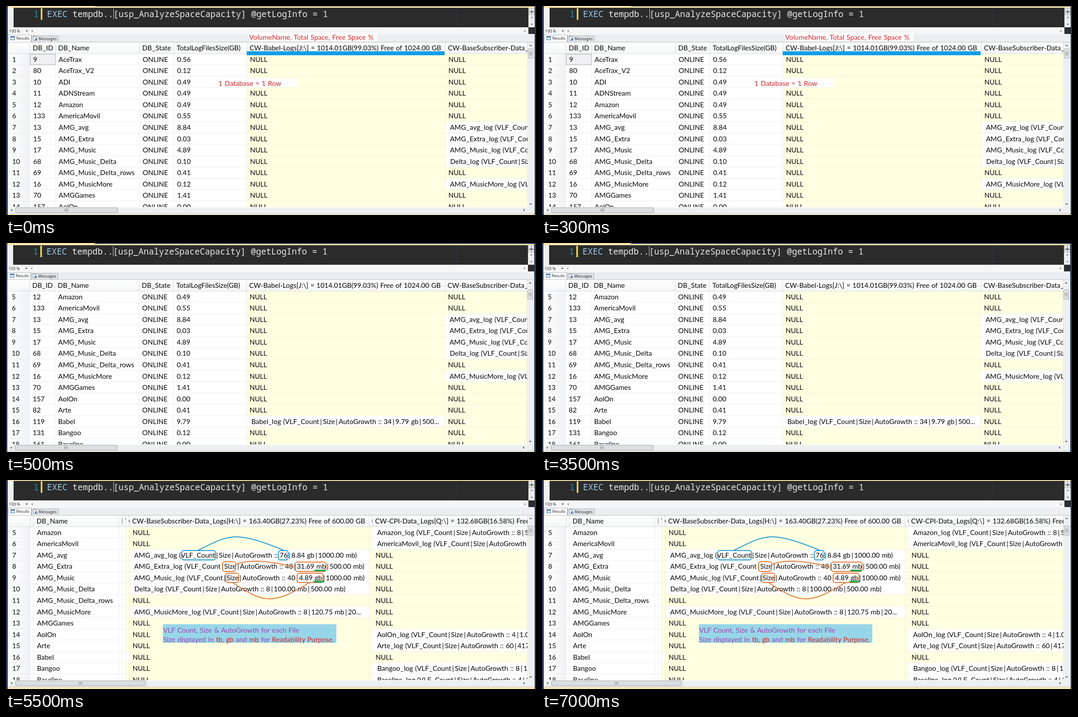
An HTML page for the animation above (8000 ms loop, 1189 px wide and 471 px high).

```html
<!DOCTYPE html>
<html lang="en">
<head>
<meta charset="utf-8">
<title>Log space report</title>
<style>
html, body { margin: 0; width: 100%; height: 100%; overflow: hidden; background: #293955; }
body { position: relative; }
.scene, .app, .col, .row, .note, svg { position: absolute; }
.scene { left: 0; top: 0; width: 1189px; height: 471px; overflow: hidden; visibility: hidden; }
.app { left: 0; top: 0; width: 1189px; height: 475px; }
svg { left: 0; top: 0; overflow: visible; }
.col, .note { font: 15.4px/25px Lato, sans-serif; word-spacing: .05em; white-space: pre; color: #080808; }
.col { top: 82px; height: 371px; overflow: hidden; background: #fff; }
.row { left: 0; right: 0; height: 25.58px; line-height: 25.58px; padding-left: 7px; overflow: hidden;
  box-sizing: border-box; box-shadow: inset -1px -1px #ececec; }
.head { top: 0; padding-left: 6px; background: linear-gradient(#fff, #f4f5f6); box-shadow: inset -1px -1px #dcdcdc; }
.null { background: #ffffe1; box-shadow: inset -1px -1px #f3f3dc; }
.num { background: linear-gradient(90deg, #fff, #f1f2f4); font-size: 15px; }
.picked { background: #f0f0f4; outline: 1px solid #a9a9ad; outline-offset: -1px; }
.note { font-size: 15.55px; line-height: 20px; word-spacing: .065em; color: #d0262b; }
.purple { color: #9a48ae; }
i { display: inline-block; width: .54em; text-align: center; font-style: normal; }
.code { font: 19.1px "Noto Sans Mono", monospace; fill: #e9e9e9; white-space: pre; }
.ui { font: 8.9px "Open Sans", sans-serif; fill: #222; }
</style>
</head>
<body>
<script>
const rows = `9 AceTrax 0.56,80 AceTrax_V2 0.12,10 ADI 0.49,11 ADNStream 0.49,12 Amazon 0.49,
133 AmericaMovil 0.55,13 AMG_avg 8.84,15 AMG_Extra 0.03,17 AMG_Music 4.89,68 AMG_Music_Delta 0.10,
69 AMG_Music_Delta_rows 0.41,16 AMG_MusicMore 0.12,70 AMGGames 1.41,157 AolOn 0.00,82 Arte 0.41,
119 Babel 9.79,131 Bangoo 0.12,161 Baseline 0.00`.split(',').map(r => r.trim().split(' '));

const log = (name, info) => ` ${name}_log (VLF_Count|Size|AutoGrowth :: ${info}`;
const babelLogs = { 16: log('Babel', '34|9.79 gb|500...') };
const baseLogs = {
  7: log('AMG_avg', '76|8.84 gb|1000.00 mb)'),
  8: log('AMG_Extra', '48|31.69 mb|500.00 mb)'),
  9: log('AMG_Music', '40|4.89 gb|1000.00 mb)'),
  10: log('Delta', '8|100.00 mb|500.00 mb)'),
  12: log('AMG_MusicMore', '8|120.75 mb|20...')
};
const cpiLogs = {
  5: log('Amazon', '8|500.00 mb|500.00 mb)'),
  6: log('AmericaMovil', '8|500.00 mb)'),
  14: log('AolOn', '4|1.00 mb|500.00 mb)'),
  15: log('Arte', '60|417.00 mb|500.00 mb)'),
  17: log('Bangoo', '8|120.00 mb|500.00 mb)'),
  18: log('Baseline', '4|1.00 mb|500.00 mb)')
};

const field = k => n => rows[n - 1][k];
const logs = set => n => set[n] || 'NULL';
const number = n => n, online = () => 'ONLINE';
const babelTitle = 'CW-Babel-Logs[J:\\] = 1014.01GB(99.03%) Free of 1024.00 GB';
const baseTitle = 'CW-BaseSubscriber-Data_Logs[H:\\] = 163.40GB(27.23%) Free of 600.00 GB';
const cpiTitle = 'CW-CPI-Data_Logs[Q:\\] = 132.68GB(16.58%) Free of 800.00 GB';

// Columns: left edge, title, value of row n; each ends where the next begins.
const leftView = [
  [7, '', number], [54, 'DB_ID', field(0)], [111, 'DB_Name', field(1)], [299.5, 'DB_State', online],
  [377, 'TotalLogFilesSize(GB)', field(2)], [540.5, babelTitle, logs(babelLogs)],
  [985.5, baseTitle, logs(baseLogs)], [1170]
];
const rightView = [
  [7, '', number], [54.7, 'DB_ID', field(0)], [62.5, 'DB_Name', field(1)], [253, 'DB_State', online],
  [261, 'TotalLogFilesSize(GB)', field(2)], [269, babelTitle, logs(babelLogs)],
  [277, baseTitle, logs(baseLogs)], [814.5, 'CW', () => 'NULL'], [822, cpiTitle, logs(cpiLogs)], [1170]
];

// Underscores and bars take a wider cell than the font gives them.
const wide = s => String(s).replace(/[_|]/g, '<i>$&</i>');
const rect = (x, y, w, h, fill, more = '') =>
  `<rect x="${x}" y="${y}" width="${w}" height="${h}" fill="${fill}" ${more}/>`;
const path = (d, fill, more = '') => `<path d="${d}" fill="${fill}" ${more}/>`;
const svg = body => `<svg width="1189" height="475">${body}</svg>`;
const note = (x, y, body) => `<div class="note" style="left:${x}px;top:${y - 10}px">${body}</div>`;

function column([x, title, value], end, first) {
  const w = end - x;
  let html = `<div class="row head" style="height:25.5px">${wide(title)}</div>`;
  for (let i = 0; i < 14; i++) {
    const n = first + i, v = value(n);
    const kind = v === 'NULL' ? 'null' : value === number ? 'num' : n === 1 && title === 'DB_ID' ? 'picked' : '';
    html += `<div class="row ${kind}" style="top:${25.5 + i * 25.58}px">${w < 10 ? '' : wide(v)}</div>`;
  }
  return `<div class="col" style="left:${x}px;width:${w}px">${html}</div>`;
}

const grid = (view, first) => view.slice(0, -1).map((c, i) => column(c, view[i + 1][0], first)).join('');

function chrome(codeY, thumbY, thumbW) {
  const edge = 'stroke="#a3a6aa" rx="1.5"';
  return svg(
    rect(4, 1, 1182, 474, '#f0f0f0') + rect(4, -1, 196, 3, '#f8e6ab') + rect(4, 1, 1182, 3, '#f8e6ab') +
    rect(17, 4, 1155, 44, '#2b2b2b') + rect(78, 5, 3.5, 26, '#f2dc55') +
    rect(241, 6, 1, 23, '#ddd') +
    path('M1011.5 4V48', 'none', 'stroke="#3d5270" stroke-dasharray="1 2"') +
    `<text class="code" x="62" y="${codeY}" style="fill:#2b91af">1</text>` +
    `<text class="code" x="92" y="${codeY}"><tspan fill="#9fcbe8">EXEC</tspan>` +
    ' tempdb..[usp_AnalyzeSpaceCapacity] @getLogInfo = 1</text>' +
    rect(1172.5, 4, 13, 44, '#eee') + rect(1173.5, 5.5, 12, 14, '#f7f7f7', 'stroke="#999"') +
    path('M1175 12h9M1175 14h9M1179.5 7v11', 'none', 'stroke="#333"') +
    path('M1177 27l2.5-3 2.5 3zM1177 40l2.5 3 2.5-3z', '#666') +
    rect(4, 48, 1168, 16, '#f6f6f6') + rect(1172, 48, 14, 15, '#2d2d30') +
    '<text class="ui" x="7" y="59.5">100 %</text>' +
    path('M44 55h5l-2.5 3z', '#333') + path('M60 54v5l-3-2.5zM1163 54v5l3-2.5z', '#777') +
    rect(4, 64, 1182, 18, '#eceef1') + rect(57.5, 67.5, 60, 14, '#e3e5e9', 'stroke="#a6aab2"') +
    rect(5.5, 65.5, 51, 17, '#fff', 'stroke="#b5b9c0"') +
    rect(10.5, 68.5, 9, 8, '#fff', 'stroke="#4c72a8"') + rect(10, 68, 10, 3, '#4c72a8') +
    path('M13.5 70v7M16.5 70v7M10 74h10', 'none', 'stroke="#8aa6cf" stroke-width=".7"') +
    rect(61.5, 68.5, 6, 9, '#fff', 'stroke="#7d8796"') + rect(65, 73, 5, 5, '#6d87b0') +
    '<text class="ui" x="23" y="76">Results</text><text class="ui" x="73" y="77">Messages</text>' +
    rect(4, 82, 1180, 386, '#fff') + rect(7, 81, 1177, 1, '#b9bcc2') +
    rect(1170, 82, 14, 372, '#eeeff0') + rect(1171.5, thumbY + .5, 11, 21, '#e0e2e5', edge) +
    path('M1174 90l3-3 3 3zM1174 445l3 3 3-3z', '#555') +
    path(`M1174 ${thumbY + 8}h6m-6 3h6m-6 3h6`, 'none', 'stroke="#777"') +
    rect(7, 454, 1177, 13, '#eeeff0') + rect(21.5, 454.5, thumbW, 11, '#dcdee1', edge) +
    path('M14 457v6l-3-3zM1161 457v6l3-3z', '#555') +
    path(`M${18 + thumbW / 2} 457v6m3-6v6m3-6v6`, 'none', 'stroke="#777"') +
    rect(4, 467, 1182, 2, '#d9dce3') + rect(4, 469, 1182, 6, '#f8e6ab'));
}

const captions =
  svg(rect(545, 60, 288, 19, '#fff') + rect(540, 102, 444, 9, '#0f9fe6') + rect(474, 163, 181, 20, '#fff')) +
  note(545.5, 70, 'VolumeName, Total Space, Free Space %') +
  note(476.5, 174, '1 Database = 1 Row');

const blue = 'stroke="#1c9ad6" stroke-width="2"', orange = 'stroke="#e2762f" stroke-width="2"';
const frame = (x, y, w, h, pen) => rect(x, y, w, h, 'none', pen + ' rx="5"');
const purple = s => `<span class="purple">${s}</span>`;
const markings =
  svg(frame(394, 159, 76, 21, blue) + frame(611, 159, 22, 21, blue) +
    path('M430 159C465 141 490 128 516 128S580 140 624 159', 'none', blue) +
    frame(486, 184, 29, 22, orange) + frame(649, 185, 69, 21, orange) +
    frame(493, 210, 29, 21, orange) + frame(653, 210, 58, 21, orange) +
    path('M515 190C545 179 585 181 649 196', 'none', orange) +
    path('M508 231C540 252 565 268 592 268S650 250 681 231', 'none', orange) +
    rect(692, 202, 25, 4, '#22a84c') + rect(690, 227, 23, 4, '#22a84c') +
    rect(352, 325, 389, 42, '#97d6e8')) +
  note(352.5, 337.5, purple('VLF Count, Size &amp; AutoGrowth for each File')) +
  note(352.5, 358.5,
    `${purple('Size displayed in')} tb, gb ${purple('and')} mb ${purple('for')} Readability Purpose.`);

function scene(dx, dy, view, first, codeY, thumbY, thumbW, notes) {
  const el = document.createElement('div');
  el.className = 'scene';
  el.innerHTML = `<div class="app" style="left:${dx}px;top:${dy}px">` +
    chrome(codeY, thumbY, thumbW) + grid(view, first) + '</div>' + notes;
  document.body.append(el);
  return el;
}

const scenes = [
  scene(0, 0, leftView, 1, 24.5, 96, 229, captions),
  scene(-1, 1, leftView, 5, 24.5, 104, 229, ''),
  scene(0, -2, rightView, 5, 25, 105, 292, markings)
];

function draw() {
  const t = performance.now() % 8000;
  const current = t < 500 ? 0 : t < 5500 ? 1 : 2;
  scenes.forEach((s, i) => s.style.visibility = i === current ? 'visible' : 'hidden');
  requestAnimationFrame(draw);
}
draw();
</script>
</body>
</html>
```
